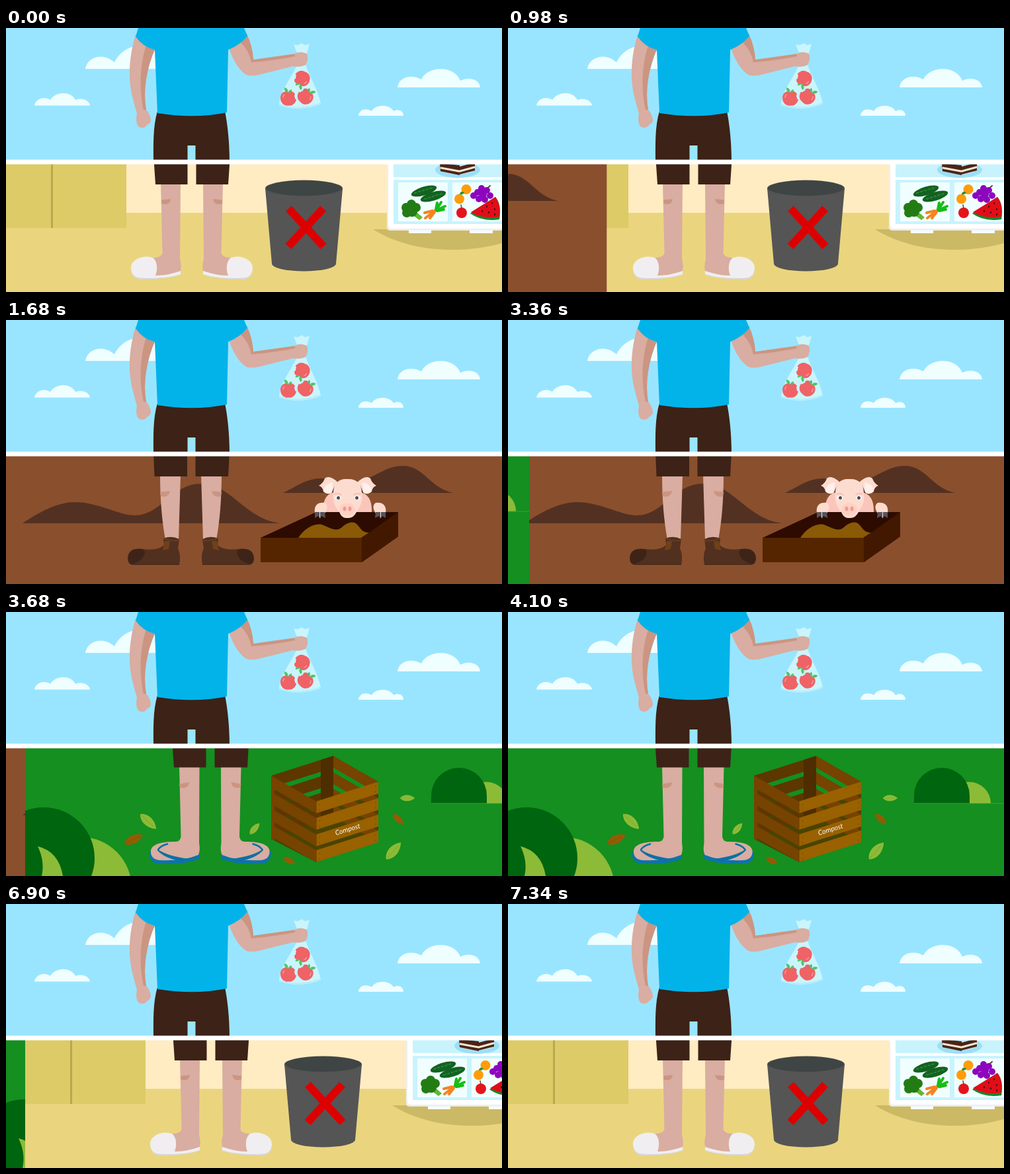
Write an HTML page without scripts that moves like this. It is 750x400 px and loops after 8.14 s.

```html
<!DOCTYPE html>
<html lang="en">
<head>
<meta charset="utf-8">
<title>Food waste choices</title>
<style>
  html, body { margin: 0; width: 100%; height: 100%; overflow: hidden; background: #99e5ff; }
  svg { display: block; width: 100%; height: 100%; }

  .slide { transform: translateX(-750px); animation: 8140ms cubic-bezier(.333, 0, .667, 1) infinite; }
  .to-farm { animation-name: farm; }
  .to-garden { animation-name: garden; }
  .to-kitchen { animation-name: kitchen; }
  /* each scene slides over the last, overshoots, then settles */
  @keyframes farm {
    0%, 10.811% { transform: translateX(-750px); }
    15.233% { transform: translateX(28.5px); }
    20.639%, 100% { transform: none; }
  }
  @keyframes garden {
    0%, 40.75% { transform: translateX(-750px); }
    45.172% { transform: translateX(29px); }
    50.369%, 100% { transform: none; }
  }
  @keyframes kitchen {
    0%, 80.34% { transform: translateX(-750px); }
    84.767% { transform: translateX(29px); }
    90.172%, 100% { transform: none; }
  }

  .skin { fill: #d9ada1; }
  .shade { fill: #cb9582; }
  .shorts { fill: #3c2217; }
  .cloud { fill: #effeff; }
  .lime { fill: #8cbb37; }
  .bush { fill: #00650f; }
  .rust { fill: #945c05; }
  .hill { fill: #533122; }
  .line { fill: none; stroke-linecap: round; }
</style>
</head>
<body>
<svg viewBox="0 0 750 400" preserveAspectRatio="none">
  <defs>
    <clipPath id="stage"><path d="M-4 200H750V400H-4Z"/></clipPath>
    <clipPath id="frame"><path d="M0 200H750V400H0Z"/></clipPath>

    <g id="apple">
      <path d="M0 -9C-6 -12 -12 -7 -12 0C-12 8 -6 12.500 0 11.500C6 12.500 11 8 12 2Q9 2 10 -1Q8 -2 10 -6C7 -11 4 -10.500 0 -9Z" fill="#ef6265"/>
      <path d="M-1 -8Q-7 -10 -6 -16Q1 -14 -1 -8ZM0 -8Q0 -12 5 -13Q6 -8 0 -8Z" fill="#50c464"/>
      <path class="line" d="M-8 -1Q-8 -4 -6 -5" stroke="#f9a5a5" stroke-width="1.300"/>
    </g>
    <g id="leaf">
      <path d="M-15 0C-9 -8 5 -9 15 0C5 8 -8 8 -15 0Z"/>
      <path class="line" d="M-13 0H10" stroke="#000" stroke-opacity=".08"/>
    </g>

    <g id="slipper">
      <path class="skin" d="M234 234H264L263 350Q267 364 262 373L213 376L221 348Q235 348 236.500 341Z"/>
      <path class="shade" d="M235 260.500L249 259Q247 270 235.300 266Z"/>
      <path d="M189 365Q190 377 201 378Q240 382 264 371V374Q240 382 202 381Q189 379 189 365Z" fill="#d8d6d7"/>
      <path d="M189 365C188 350 208 343 222 348C230 354 229 368 226 375Q240 376 264 368V373Q240 381 201 378.500Q190 377 189 365Z" fill="#f0eef0"/>
    </g>
    <g id="boot">
      <path class="skin" d="M233 234H264L261 333H241Q233 290 233 234Z"/>
      <path class="shade" d="M233 260.500L248 259Q246 270 234 267Z"/>
      <path d="M238 331Q250 326 262 332L260 346Q265 356 262 371H192Q183 370 184.500 358Q187 344 207 347Q230 350 239 341Z" fill="#51301f"/>
      <path d="M192 371Q183 370 184.500 358Q187 345 207 347L210 351Q209 365 190 370H262V371Z" fill="#3e2418"/>
      <path d="M240 335H248L246 347L237 349Z" fill="#70401a"/>
      <path class="line" d="M239 331Q250 336 261 334" stroke="#6a4026" stroke-width="1.500"/>
    </g>
    <g id="flipflop">
      <path d="M188 362Q186 378 199 381Q240 384 263 374V364L220 362Z" fill="#0c74a9"/>
      <path class="skin" d="M233 234H263.500L263 350Q265 361 262 368Q238 378 202 376Q189 374 190 361C193 349 214 348 228 348Q235 347 235.500 340Z"/>
      <path class="shade" d="M233 260.500L248 258Q247 269 234 266Z"/>
      <path d="M200 359Q214 370 248 374L238 378Q212 374 200 361.500Z" fill="#0c70a5"/>
      <path class="line" d="M201 360Q205 354 215 351.500" stroke="#0c70a5" stroke-width="2.600"/>
    </g>

    <path id="slatR" d="M440 287L534 257V275L440 305Z"/>
    <path id="slatL" d="M372 248L440 287V305L372 266Z"/>
    <g id="wallR">
      <use href="#slatR"/><use href="#slatR" y="25"/><use href="#slatR" y="50"/><use href="#slatR" y="74"/>
    </g>
    <g id="wallL">
      <use href="#slatL"/><use href="#slatL" y="25"/><use href="#slatL" y="50"/><use href="#slatL" y="74"/>
    </g>

    <g id="home" clip-path="url(#frame)">
      <path d="M0 200H750V282H0Z" fill="#ffecc2"/>
      <path d="M0 280H750V400H0Z" fill="#ead57e"/>
      <path d="M0 200H182V303H0Z" fill="#dccb66"/>
      <path d="M68 200H71V303H68Z" fill="#b9a84e"/>

      <path d="M555 305C610 340 690 343 750 326V305Z" fill="#cbb966"/>
      <path d="M609 305H643V311H609ZM701 305H736V311H701Z" fill="#f7fbfb"/>
      <path d="M576 200H750V306.500H581Q576 306.500 576 301Z" fill="#fff"/>
      <path d="M576 300Q576 306.500 581 306.500H750V304H584Q578 304 578 298V207H576Z" fill="#eceff0"/>
      <path d="M586 200H750V226H586ZM586 230H750V297H586Z" fill="#c8f3fd"/>
      <path d="M593 234H668V293H593ZM675 234H750V293H675Z" fill="#f1feff"/>

      <ellipse cx="683" cy="215" rx="34" ry="12" fill="#9cdff5"/>
      <ellipse cx="683" cy="214" rx="25" ry="7" fill="#c8effa"/>
      <g fill="#4b2418">
        <path d="M656 205L686 208V223L657 217Z"/>
        <path d="M682 211L709 204V216L685 222Z"/>
      </g>
      <path class="line" d="M658 212L685 217M686 217L708 211" stroke="#f8e6cf" stroke-width="3"/>

      <g fill="#126321">
        <ellipse cx="632" cy="247" rx="20" ry="6.500" transform="rotate(-17 632 247)"/>
        <ellipse cx="646" cy="255" rx="20" ry="6.500" transform="rotate(-17 646 255)"/>
      </g>
      <path class="line" d="M618 250L645 242M633 259L659 251" stroke="#36893a" stroke-width="1.500" stroke-dasharray="3 3"/>
      <path d="M612 276L622 280L630 287L625 291L617 285Z" fill="#66b636"/>
      <g fill="#227c13">
        <circle cx="605" cy="272" r="7"/><circle cx="613" cy="267" r="7"/>
        <circle cx="620" cy="272" r="7"/><circle cx="606" cy="280" r="7"/><circle cx="614" cy="278" r="8"/>
      </g>
      <path class="line" d="M652 274L634 288M648 279L641 288M645 277L633 280" stroke="#f58320" stroke-width="4"/>
      <path class="line" d="M650 275L652 265M651 275L658 264M651 276L664 270M652 277L662 275" stroke="#16bd16" stroke-width="4"/>

      <g fill="#ff9c08"><circle cx="696" cy="244.500" r="7.500"/><circle cx="685.500" cy="259" r="7.500"/></g>
      <path d="M686 252Q687 246 693 249Q691 253 686 252Z" fill="#269334"/>
      <path class="line" d="M724 246L732 239" stroke="#6d431c" stroke-width="2"/>
      <g fill="#8d06bd">
        <circle cx="719" cy="243" r="5"/><circle cx="727" cy="246" r="5"/><circle cx="713" cy="249" r="5"/>
        <circle cx="721" cy="252" r="6"/><circle cx="707" cy="254" r="5"/><circle cx="732" cy="254" r="5"/>
        <circle cx="715" cy="259" r="5"/><circle cx="724" cy="260" r="5"/>
      </g>
      <circle cx="689" cy="280" r="8" fill="#e5141c"/>
      <path class="line" d="M689 273L688 268" stroke="#6d431c" stroke-width="1.500"/>
      <path d="M702 281L740 256Q750 268 746 290Q720 294 702 281Z" fill="#17862a"/>
      <path d="M703 279L740 256Q749 268 745 286Q722 290 703 279Z" fill="#e10d18"/>
      <path class="line" d="M727 270v1M735 265v1M739 274v1M730 279v1M720 277v1M739 282v1" stroke="#38100d" stroke-width="2"/>

      <use href="#slipper"/>
      <use href="#slipper" transform="matrix(-1 0 0 1 562 0)"/>
      <path class="shorts" d="M223.500 200H274.500V237H226ZM287.500 200H338.500L336 237H287.500Z"/>

      <path d="M392 243L402 357A48.500 11.500 0 0 0 499 357L509 243Z" fill="#555"/>
      <ellipse cx="450.500" cy="243" rx="58.500" ry="12.500" fill="#3f4544"/>
      <path class="line" d="M392.500 243A58 12 0 0 0 508.500 243" stroke="#5a5c5b"/>
      <path d="M427.500 273.500L480 331M479.500 273.500L427 331" stroke="#dc0000" stroke-width="12"/>
    </g>
  </defs>

  <use href="#home"/>

  <g class="slide to-farm"><g clip-path="url(#stage)">
    <path d="M-4 200H750V400H-4Z" fill="#8a4f2d"/>
    <path class="hill" d="M25 308C55 288 80 276 104 276C140 276 170 296 195 296C235 296 250 248 295 248C340 248 360 300 414 308Z"/>
    <path class="hill" d="M419 262C445 250 462 232 500 244Q516 250 530 246C556 240 574 221 600 221C632 221 640 254 676 262Z"/>

    <use href="#boot"/>
    <use href="#boot" transform="matrix(-1 0 0 1 559 0)"/>
    <path class="shorts" d="M223 200H274V237H224.500ZM286.500 200H338L336 237H286.500Z"/>

    <path d="M385 330L469 291H593V328L538 367H385Z" fill="#2d0b00"/>
    <path d="M538 330L593 291V328L538 367Z" fill="#421800"/>
    <path d="M385 330H538V367H385Z" fill="#552500"/>
    <path d="M442 330C452 315 468 306 480 311S500 321 508 314S524 304 530 309S537 322 549 322L537 330Z" fill="#8a5a06"/>

    <path d="M480 291C478 270 488 260 500 261H532C546 261 554 272 553 291Z" fill="#fac5bb"/>
    <g id="pigside">
      <path d="M467 293C465 280 472 276 482 277Q489 282 482 293Z" fill="#fddcd0"/>
      <path d="M467 291L482 291L483 300L477 297L475 301L472 297L467 300Z" fill="#56545a"/>
      <path class="line" d="M474.500 291V299" stroke="#e9ddda"/>
    </g>
    <use href="#pigside" transform="matrix(-1 0 0 1 1041 0)"/>
    <path d="M516 241C503 240 495 248 495 262C493 277 499 284 504 291Q508 301 516 300Q525 301 530 291C535 284 540 276 538 262C538 248 530 240 516 241Z" fill="#fddcd0"/>
    <g id="pigface">
      <path d="M502 246Q489 234 482 240Q480 247 473 251Q479 253 480 260Q487 266 493 261Q496 251 502 246Z" fill="#fddcd0"/>
      <path d="M494 246Q481 248 480 260Q487 266 493 261Z" fill="#fff0ec"/>
      <ellipse cx="502" cy="269.500" rx="4.500" ry="3" fill="#fff"/>
      <circle cx="502.500" cy="269.500" r="2.500" fill="#4d4b50"/>
      <path class="line" d="M497 264Q502 261 507 265" stroke="#f3b9ae" stroke-width="1.500"/>
    </g>
    <use href="#pigface" transform="matrix(-1 0 0 1 1033 0)"/>
    <ellipse cx="516" cy="287" rx="12" ry="10" fill="#ffd0c3"/>
    <ellipse cx="512" cy="286" rx="2.500" ry="3.500" fill="#ef9b96"/>
    <ellipse cx="520" cy="286" rx="2.500" ry="3.500" fill="#ef9b96"/>
  </g></g>

  <g class="slide to-garden"><g clip-path="url(#frame)">
    <path d="M0 200H750V400H0Z" fill="#148f20"/>
    <circle class="lime" cx="84" cy="418" r="77"/>
    <circle class="bush" cx="28" cy="373" r="77"/>
    <path class="lime" d="M19 355Q51 363 57 400H25Q30 378 19 355Z"/>
    <path class="lime" d="M665 290A32.500 32.500 0 0 1 730 290Z"/>
    <path class="bush" d="M614 290V278A42 42 0 0 1 698 278V290Z"/>
    <path d="M614 290H750" stroke="#4da52c" stroke-width=".8"/>

    <g class="lime">
      <use href="#leaf" transform="translate(186 317.500) rotate(43) scale(1.100)"/>
      <use href="#leaf" transform="translate(347 328.500) rotate(-49) scale(.74)"/>
      <use href="#leaf" transform="translate(578 282) scale(.75)"/>
      <use href="#leaf" transform="translate(557 362) rotate(-49) scale(1.130)"/>
    </g>
    <g class="rust">
      <use href="#leaf" transform="translate(164 344.500) rotate(-25) scale(1.050)"/>
      <use href="#leaf" transform="translate(399 377) rotate(27) scale(.68)"/>
      <use href="#leaf" transform="translate(564 314) rotate(45) scale(.75)"/>
    </g>

    <use href="#flipflop"/>
    <use href="#flipflop" transform="matrix(-1 0 0 1 559.500 0)"/>
    <path class="shorts" d="M222.500 200H273.500V235.500H225ZM286.500 200H338L336 235.500H286.500Z"/>

    <!-- crate: floor and far walls first, then the two near walls -->
    <path d="M372 266L440 305L534 275V347L440 379L372 344Z" fill="#4a4300"/>
    <use href="#wallR" transform="translate(-68 -39)" fill="#5d3700"/>
    <use href="#wallL" transform="translate(94 -30)" fill="#764300"/>
    <path d="M447 224L466 218V314L447 320Z" fill="#4e2d00"/>
    <g fill="#774300">
      <use href="#wallL"/>
      <path d="M372 248L377 251V346L372 344Z"/>
    </g>
    <use href="#wallR" fill="#996100"/>
    <path d="M440 287V379" stroke="#6c3c00" stroke-width=".8"/>
    <path class="line" d="M445 292V377M530 264V346" stroke="#6b4000" stroke-width="1.500" stroke-dasharray="0 8.200"/>
    <text transform="translate(470 338.500) rotate(-17)" font-family="Lato, sans-serif" font-size="10.500" font-style="italic" fill="#fff">Compost</text>
  </g></g>

  <g class="slide to-kitchen"><use href="#home"/></g>

  <path d="M0 0H750V200H0Z" fill="#99e5ff"/>
  <g class="cloud">
    <path d="M120 62C122 44 147 36 164 52C172 36 187 27 202 27Q235 30 240 62Z"/>
    <path d="M43 117.500C45 106 59 103 67 109C75 96 98 95 105 109C114 105 126 109 127 117.500Z"/>
    <path d="M592 90C594 73 615 70 628 78C638 57 678 56 687 80C700 73 716 78 717 90Z"/>
    <path d="M533 133C534 123 545 121 553 126C559 115 580 115 586 126C593 122 601 125 601 133Z"/>
  </g>

  <path class="skin" d="M196 10C187 40 184 70 190 100Q195 120 198 130Q195 144 201 150Q210 153 213 147Q220 144 219 138Q217 129 212 124C207 95 212 62 226 30Z"/>
  <path class="shade" d="M212 26C204 52 200 85 208 124L212 124C207 95 212 62 226 30Z"/>

  <path d="M435 25L441 26L447 23L452 26L459 24L455 38L453 55C458 73 473 95 476 115Q445 128 413 117C414 94 434 73 440 55L440 38Z" fill="#caf5fc"/>
  <path class="line" d="M414 116Q445 126 475 114" stroke="#b5ebf7" stroke-width="1.500"/>
  <use href="#apple" transform="translate(447.500 77) rotate(205)"/>
  <use href="#apple" transform="translate(427 106)"/>
  <use href="#apple" transform="matrix(-1 0 0 1 453 103.500) rotate(-45)"/>

  <path class="skin" d="M336 28Q347 60 362 70Q368 74 382 71L434 58Q445 60 453 56Q458 47 455 39Q445 34 436 39L374 48Q373 28 364 9Z"/>
  <path class="shade" d="M353 20L364 9Q373 28 374 48L436 39.500L437 43Q400 50 371 52Q368 34 353 20Z"/>
  <path class="shorts" d="M229 126C222 150 223 176 223 203H274.500V178H286.500V203H338C338 172 335 146 331 126Z"/>
  <path d="M200 0L196 13Q207 29 225 33L229 129Q285 138 334 128L336 33Q354 26 365 12L360 0Z" fill="#02b3e9"/>
  <path d="M0 199.500H750V206.500H0Z" fill="#fff"/>
</svg>
</body>
</html>
```
